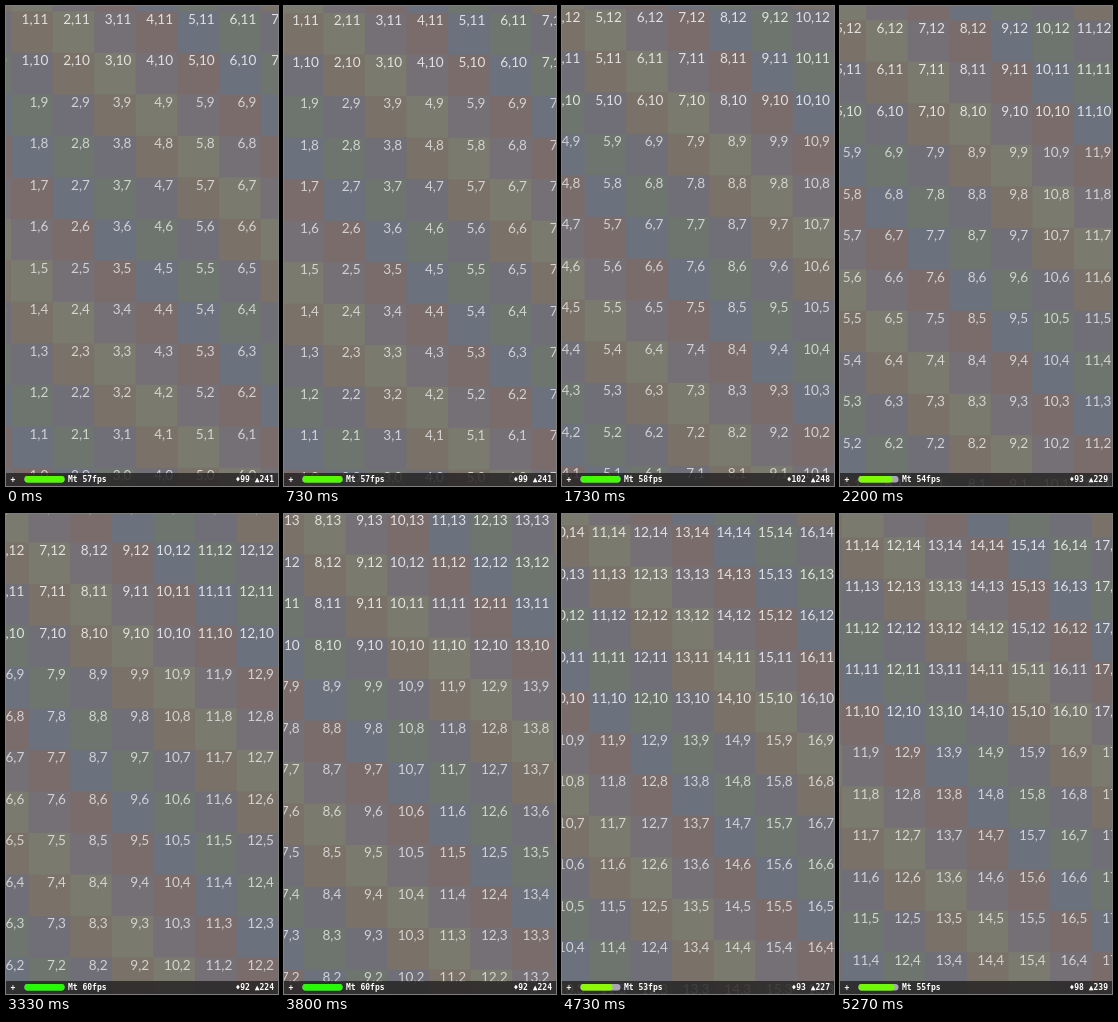
Recreate the animation shown at these times as an HTML page. Size 272 px wide and 480 px high, loop 5340 ms.

```html
<!DOCTYPE html>
<html lang="en">
<head>
<meta charset="utf-8">
<title>Endless tile grid</title>
<style>
html, body { margin: 0; width: 100%; height: 100%; overflow: hidden; background: #737071; }
svg { display: block; width: 100vw; height: 100vh; }
.label { font: 13.6px Lato, sans-serif; fill: #fff; text-anchor: end; }
.stat { font: bold 8px "DejaVu Sans Mono", monospace; fill: #fff; }
</style>
</head>
<body>
<svg id="stage" viewBox="0 0 272 480" preserveAspectRatio="none"></svg>
<script>
const LOOP = 5340, FPS = 15;
const CW = 41.6, CH = 41.5, COLS = 9, ROWS = 13;
const COLORS = ['#7b6c6c', '#6b717d', '#6e756e', '#706f78', '#7a7268', '#7a7a6e', '#757075'];

// Scroll key points: seconds, x, y
const PATH = [
  [0.6, 0, 0], [1.2, -79.7, 20], [2.2, -187, 50.5], [2.45, -191, 51.5], [3, -191, 51.5],
  [3.33, -231.6, 64.5], [3.8, -276.2, 76.7], [4.4, -365, 116.5], [5.26, -419, 142.5]
];
// Readout per second: frame rate, nodes, triangles
const STATS = ['57 99 241', '58 102 248', '54 93 229', '60 92 224', '53 93 227', '55 98 239'];

const stage = document.getElementById('stage');

function set(el, attrs) {
  for (const name in attrs) el.setAttribute(name, attrs[name]);
}

function add(tag, attrs, parent = stage) {
  const el = document.createElementNS('http://www.w3.org/2000/svg', tag);
  set(el, attrs);
  return parent.appendChild(el);
}

function speed(i, d) {
  const [a, b] = [PATH[i], PATH[i + 1]];
  return (b[d] - a[d]) / (b[0] - a[0]);
}

function slope(i, d) {
  if (i === 0 || i === PATH.length - 1) return 0;
  const a = speed(i - 1, d), b = speed(i, d);
  return a * b > 0 ? 2 * a * b / (a + b) : 0;
}

// Monotone cubic: swipes ease in and out and never overshoot.
function scroll(s, d) {
  let i = 0;
  while (i < PATH.length - 2 && s >= PATH[i + 1][0]) i++;
  const a = PATH[i], b = PATH[i + 1], h = b[0] - a[0];
  const u = Math.min(1, Math.max(0, (s - a[0]) / h)), v = 1 - u;
  return v * v * (1 + 2 * u) * a[d] + u * u * (1 + 2 * v) * b[d]
    + h * u * v * (v * slope(i, d) - u * slope(i + 1, d));
}

// Recycled tiles: the colour stays with the slot, the label changes.
const grid = add('g', {}), labels = add('g', {}), tiles = [];
for (let i = 0; i < COLS; i++) {
  for (let j = 0; j < ROWS; j++) {
    const x = i * CW, y = -j * CH;
    add('rect', { x, y, width: CW + 0.3, height: CH + 0.3, fill: COLORS[(i + j + 6) % 7] }, grid);
    const text = add('text', { class: 'label', x: x + 37.3, y: y + 12.6 }, labels);
    tiles.push({ i, j, text });
  }
}

const pill = { x: 18.5, y: 470, height: 6.5, rx: 3 };
add('rect', { y: 467, width: 272, height: 13, fill: '#262424', 'fill-opacity': 0.84 });
add('text', { class: 'stat', x: 4.5, y: 476 }).textContent = '+';
add('rect', { ...pill, width: 40, fill: '#aaa5b6' });
const meter = add('rect', pill);
const rate = add('text', { class: 'stat', x: 62, y: 476 });
const counts = add('text', { class: 'stat', x: 268, y: 476, 'text-anchor': 'end' });

function drawGrid(s) {
  const x = scroll(s, 1), y = scroll(s, 2);
  const col = Math.ceil((-37 - x) / CW);
  const row = Math.ceil((y - 28.5) / CH);
  const left = 5 + x + (col - 1) * CW;
  const top = 461.5 + y - row * CH;
  for (const g of [grid, labels]) set(g, { transform: `translate(${left} ${top})` });
  for (const { i, j, text } of tiles) {
    const r = row + j;
    text.textContent = `${col + i},${r}`;
    set(text, { 'fill-opacity': r > 9 ? 0.78 : 0.68 });
  }
}

function drawStats(step) {
  const [fps, nodes, tris] = STATS[Math.max(0, Math.floor((step - 1) / FPS))].split(' ');
  rate.textContent = `Mt ${fps}fps`;
  counts.textContent = `♦${nodes} ▲${tris}`;
  const lag = 60 - fps;
  set(meter, {
    width: Math.min(40, 46 - 2 * lag),
    fill: `hsl(${112 - 3.7 * lag}, 96%, 50%)`
  });
}

function draw(t) {
  const step = Math.min(79, Math.floor((t + 4) * FPS / 1000));
  drawGrid(step / FPS);
  drawStats(step);
}

const start = performance.now();
function tick() {
  draw((performance.now() - start) % LOOP);
  requestAnimationFrame(tick);
}
tick();
</script>
</body>
</html>
```
